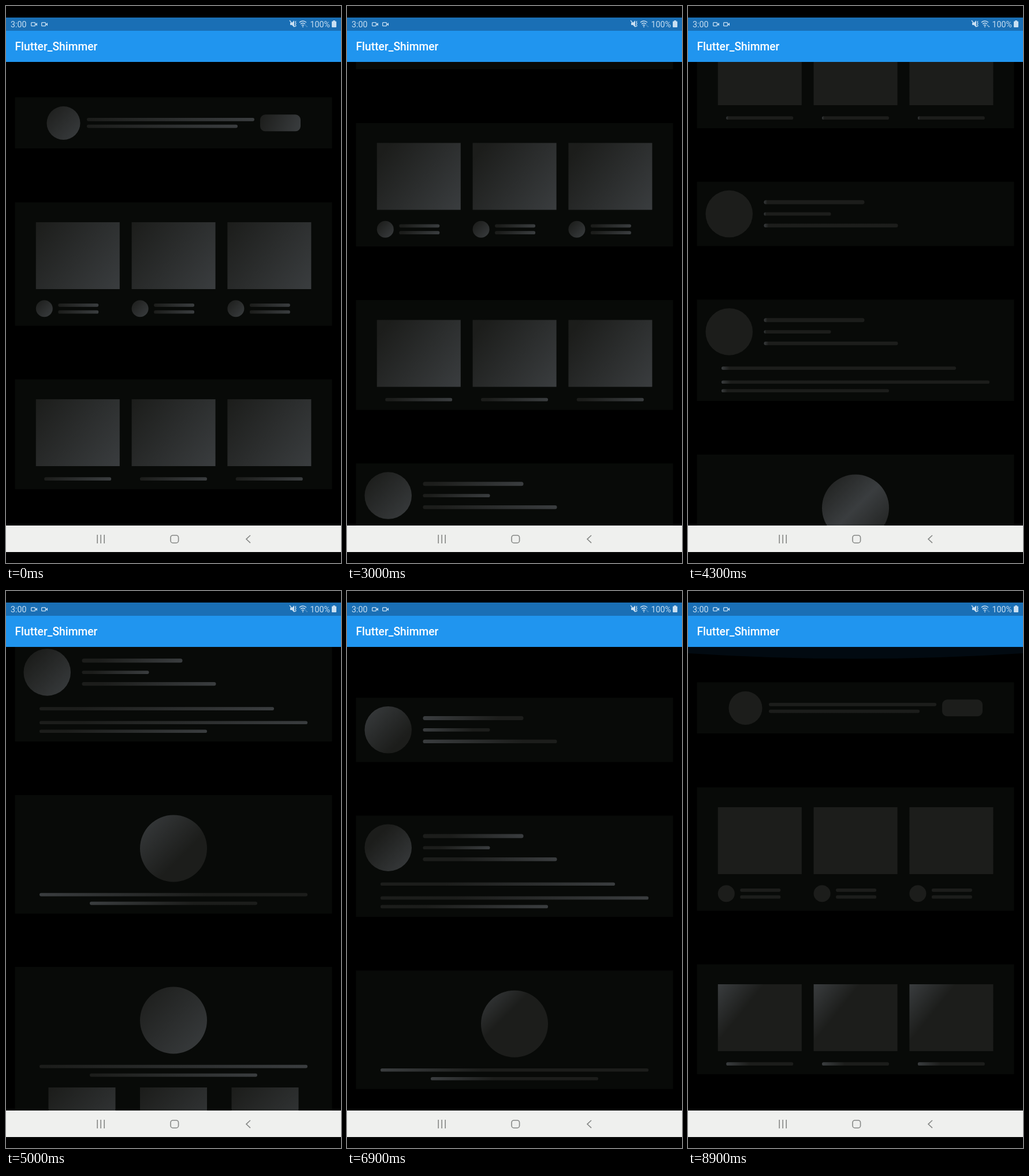
An HTML page with a canvas for the animation above (9 s loop, 580 px wide and 966 px high).

```html
<!DOCTYPE html>
<html lang="en">
<head>
<meta charset="utf-8">
<title>Shimmer list</title>
<style>
  html, body { margin: 0; width: 100%; height: 100%; overflow: hidden; background: #000; }
  canvas, svg { position: absolute; left: 0; top: 0; display: block; }
  text { font-family: Roboto, sans-serif; }
</style>
</head>
<body>
<canvas id="list" width="580" height="966"></canvas>
<svg width="580" height="966" viewBox="0 0 580 966">
  <rect y="20" width="580" height="23" fill="#1a6fb5"/>
  <rect y="43" width="580" height="54" fill="#2095ef"/>
  <text x="15.5" y="77" font-size="19.3" font-weight="500" fill="#fff">Flutter_Shimmer</text>

  <g fill="#c8dff2">
    <text x="8" y="37" font-size="14.3">3:00</text>
    <text x="526.5" y="37" font-size="14.2">100%</text>
    <g id="cam">
      <rect x="43.7" y="28.7" width="6.8" height="6" rx="1" fill="none" stroke="#c8dff2" stroke-width="1.3"/>
      <path d="M50.6 31.7L54 29V34.6Z"/>
    </g>
    <use href="#cam" x="18"/>
    <path d="M492 29h3l4-4v12l-4-4h-3z"/>
    <path d="M491 25l9 11M502 26l-1.2 2 1.2 2-1.2 2 1.2 2-1.2 2" fill="none" stroke="#c8dff2" stroke-width="1.3"/>
    <path d="M508 28.5q6-5 12 0M510 31.3q4-3.4 8 0M512 34q2-1.8 4 0" fill="none" stroke="#c8dff2" stroke-width="1.4"/>
    <circle cx="514" cy="36" r="1"/>
    <path id="net" d="M517.5 34.5l1.5-2 1.5 2zM519.5 35l1.5 2 1.5-2z"/>
    <path d="M566.3 25h3.4v1.5h1.3q1 0 1 1v8.5q0 1-1 1h-6q-1 0-1-1v-8.5q0-1 1-1h1.3z"/>
  </g>

  <rect y="901" width="580" height="46" fill="#eff0ee"/>
  <g fill="none" stroke="#858785" stroke-width="1.6">
    <path d="M158.2 917v15M164.2 917v15M170.2 917v15"/>
    <rect x="285" y="918" width="13.6" height="13.2" rx="4"/>
    <path d="M423 918l-7 6.6 7 6.6"/>
  </g>
</svg>
<script>
const LOOP = 9000, STEP = 100, PERIOD = 990, TURN = 6300;
const TOP = 97, BOTTOM = 901, WIDTH = 580;
const DARK = '#1c1d1b', LIGHT = '#3a3d3f', CARD = '#080a08';

const ctx = document.getElementById('list').getContext('2d');
const net = document.getElementById('net');

// Shapes are [x, y, width, height, radius], y counted from the card's top.
const line = (x, y, w, h = 5.7) => [x, y, w, h, h / 2];
const disc = (x, y, d) => [x, y, d, d, d / 2];
const box = (x, y, w, h) => [x, y, w, h, 0];
const three = (x, gap, make) => [0, 1, 2].flatMap(i => make(x + gap * i));

const profile = [disc(30.5, 15, 81.5), line(131.5, 32, 174, 7), line(131.5, 53, 116), line(131.5, 72.7, 232, 6.4)];
const page = [disc(232, 34.5, 116), line(58, 169.7, 464), line(145, 184.7, 290)];
const squares = y => three(73.5, 158.5, x => [box(x, y, 116, 116)]);

// down / up: shimmer phase before and after the scroll turns back
const cards = [
  { y: 158.3, h: 88.7, down: .668, up: .01, shapes: [
    disc(70.5, 15.7, 58), line(140, 35.7, 290), line(140, 47.4, 261), [440, 30, 70, 29, 9]] },
  { y: 340.5, h: 214, down: .668, up: .01, shapes: three(51.8, 165.8, x => [
    box(x, 34.5, 145, 116), disc(x, 169.7, 29), line(x + 38.5, 175.5, 70), line(x + 38.5, 187.3, 70)]) },
  { y: 647.5, h: 190.5, down: .668, up: .123, shapes: three(51.8, 165.8, x => [
    box(x, 34.5, 145, 116), line(x + 14.4, 169.8, 116)]) },
  { y: 930.8, h: 111.5, down: .668, up: .281, shapes: profile },
  { y: 1135.2, h: 175.8, down: .668, up: .788, shapes: [
    ...profile, line(58, 116, 406), line(58, 140.2, 464), line(58, 155.2, 290)] },
  { y: 1404, h: 205.5, down: .157, up: .157, shapes: page },
  { y: 1702, h: 495, down: .624, up: .624, shapes: [...page, ...squares(209), ...squares(363.5)] }
];

// [time, offset]
const scrollKeys = [
  [0, 0], [2300, 0], [3000, 137.5], [3500, 185], [3800, 253], [3900, 290], [4000, 290],
  [4300, 626], [4600, 850], [5000, 1050], [5400, 1150], [5800, 1210], [6100, 1357], [6450, 1357],
  [6650, 1195], [6810, 991], [6920, 707], [7150, 480], [7700, 476], [7800, 471.5], [7910, 403],
  [8200, 150], [8500, 0], [LOOP, 0]
];

// Smooth curve through the keys that never overshoots.
function follow(keys, t) {
  const rise = i => i < 0 || i > keys.length - 2 ? 0 :
    (keys[i + 1][1] - keys[i][1]) / (keys[i + 1][0] - keys[i][0]);
  const slope = i => {
    const a = rise(i - 1), b = rise(i);
    return a * b > 0 ? 2 * a * b / (a + b) : 0;
  };
  let i = 0;
  while (i < keys.length - 2 && t >= keys[i + 1][0]) i++;
  const [t0, a] = keys[i], [t1, b] = keys[i + 1];
  const d = t1 - t0, u = (t - t0) / d, v = 1 - u;
  return a * v * v * (1 + 2 * u) + b * u * u * (3 - 2 * u) +
    d * u * v * (slope(i) * v - slope(i + 1) * u);
}

const pin = n => Math.min(1, Math.max(0, n));

// The stops pile up at 0 or 1 once they leave the shape.
function shimmer(x, y, w, h, v) {
  const g = ctx.createLinearGradient(x, y, x + w, y + h);
  g.addColorStop(pin(v - 1), DARK);
  g.addColorStop(pin(v), LIGHT);
  g.addColorStop(pin(v + 1), DARK);
  return g;
}

function drawCard(card, t, offset) {
  const top = card.y - offset;
  if (top > BOTTOM || top + card.h < TOP) return;
  ctx.fillStyle = CARD;
  ctx.fillRect(15.5, top, 549, card.h);
  const v = 3 * ((t / PERIOD + (t < TURN ? card.down : card.up)) % 1) - 1;
  for (const [x, y, w, h, r] of card.shapes) {
    ctx.fillStyle = shimmer(x, top + y, w, h, v);
    ctx.beginPath();
    ctx.roundRect(x, top + y, w, h, r);
    ctx.fill();
  }
}

// Overscroll glow: swells, then fades away.
function drawGlow(t, start, edge, dir) {
  const u = (t - start) / 600;
  if (u <= 0 || u >= 1) return;
  const size = Math.sin(Math.PI * u);
  const side = edge + dir * 22 * size, mid = edge + dir * 60 * size;
  ctx.fillStyle = `rgba(33,150,243,${.13 * size})`;
  ctx.beginPath();
  ctx.moveTo(0, edge);
  ctx.lineTo(0, side);
  ctx.quadraticCurveTo(WIDTH / 2, mid, WIDTH, side);
  ctx.lineTo(WIDTH, edge);
  ctx.fill();
}

function draw(t) {
  const offset = follow(scrollKeys, t);
  ctx.fillStyle = '#000';
  ctx.fillRect(0, 0, WIDTH, 966);
  ctx.save();
  ctx.beginPath();
  ctx.rect(0, TOP, WIDTH, BOTTOM - TOP);
  ctx.clip();
  cards.forEach(card => drawCard(card, t, offset));
  drawGlow(t, 6050, BOTTOM, -1);
  drawGlow(t, 8400, TOP, 1);
  ctx.restore();
  net.style.opacity = t >= 4100 && t < 4500 ? 1 : .4;
}

const begin = performance.now();
function tick() {
  const t = (performance.now() - begin) % LOOP;
  draw(Math.floor(t / STEP) * STEP);
  requestAnimationFrame(tick);
}
tick();
</script>
</body>
</html>
```
